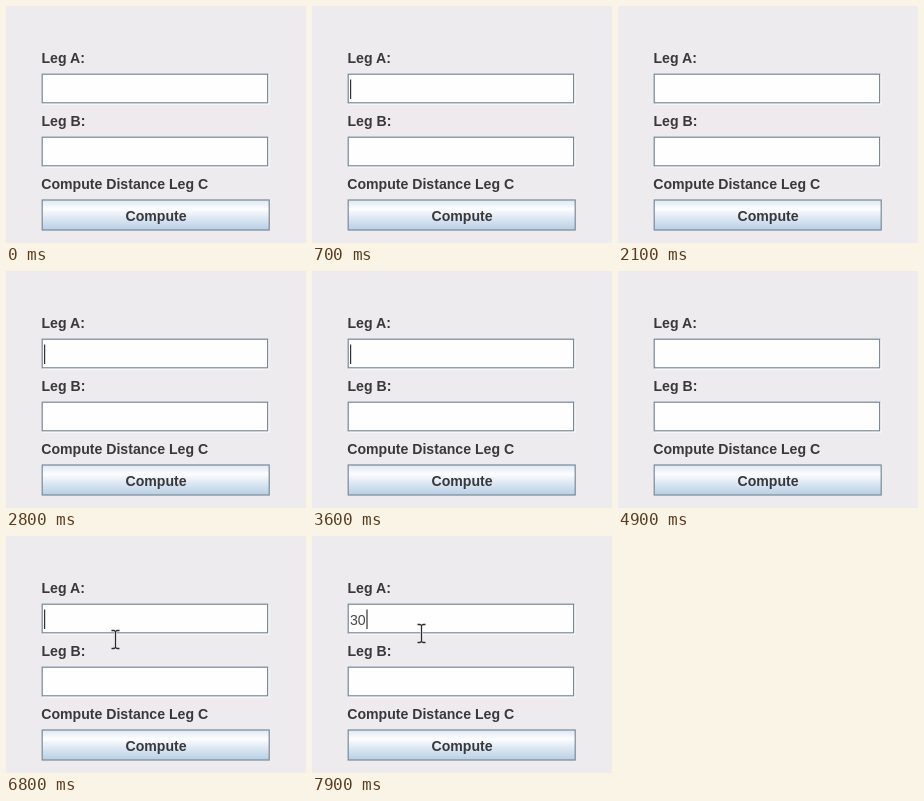
These frames come from a looping animation (300x237 px, 8 s). An HTML page:

```html
<!DOCTYPE html>
<html lang="en">
<head>
<meta charset="utf-8">
<title>Leg calculator form</title>
<style>
html, body { margin: 0; width: 100%; height: 100%; overflow: hidden; background: #edebed; }
svg { display: block; width: 300px; height: 237px; }
text { font: bold 14.1px "Liberation Sans", Arial, sans-serif; fill: #39383b; }
#value { font-weight: normal; fill: #48484a; }
rect { stroke: #7a8a99; stroke-width: 1.2; fill: #fefefe; }
.light { stroke: #fdfdfd; }
</style>
</head>
<body>
<svg viewBox="0 0 300 237">
  <defs>
    <linearGradient id="shine" x2="0" y2="1">
      <stop offset="0" stop-color="#dde8f3"/>
      <stop offset=".3" stop-color="#fdfdfe"/>
      <stop offset=".6" stop-color="#dde8f3"/>
      <stop offset="1" stop-color="#b8cfe5"/>
    </linearGradient>
    <g id="field">
      <rect class="light" x="37.4" y="1.2" width="225.4" height="28.6"/>
      <rect x="36.2" width="225.4" height="28.6" style="fill:none"/>
    </g>
  </defs>
  <text x="35.5" y="57">Leg A:</text>
  <use href="#field" y="68.2"/>
  <text x="35.5" y="120">Leg B:</text>
  <use href="#field" y="131.2"/>
  <text x="35.3" y="183">Compute Distance Leg C</text>
  <rect x="36.2" y="194" width="227" height="30" style="fill:url(#shine)"/>
  <text x="150" y="214.6" text-anchor="middle">Compute</text>
  <text id="value" x="38" y="89"></text>
  <path id="caret" d="M0 73.5V93" stroke="#333" stroke-width="1.2"/>
  <g id="pointer" fill="none">
    <path d="M-4 -9H-1.5L0 -8L1.5 -9H4M0 -8V8M-4 9H-1.5L0 8L1.5 9H4" stroke="#fff" stroke-width="2.6" opacity=".7"/>
    <path d="M-4 -9H-1.5L0 -8L1.5 -9H4M0 -8V8M-4 9H-1.5L0 8L1.5 9H4" stroke="#2b2b2d" stroke-width="1.3"/>
  </g>
</svg>
<script>
const LOOP = 8000, POINTER_IN = 5900;
const KEYS = [7400, 7600]; // key press times
const $ = id => document.getElementById(id);
const value = $("value"), caret = $("caret"), pointer = $("pointer");
const show = (el, on) => el.setAttribute("visibility", on ? "visible" : "hidden");

function ease(t, from, to) {
  const k = Math.min(1, Math.max(0, (t - from) / (to - from)));
  return k * k * (3 - 2 * k);
}

function draw(t) {
  const typed = KEYS.filter(k => t >= k).length;
  const phase = t % 1000;
  value.textContent = "30".slice(0, typed);
  // Typing keeps the caret lit.
  show(caret, typed || (phase >= 350 && phase < 850));
  caret.setAttribute("transform", `translate(${38.6 + typed * 8.2})`);
  show(pointer, t >= POINTER_IN);
  pointer.setAttribute("transform", `translate(109.5 ${103.5 - 6 * ease(t, 6900, 7400)})`);
}

const start = performance.now();
function tick() {
  draw((performance.now() - start) % LOOP);
  requestAnimationFrame(tick);
}
tick();
</script>
</body>
</html>
```
